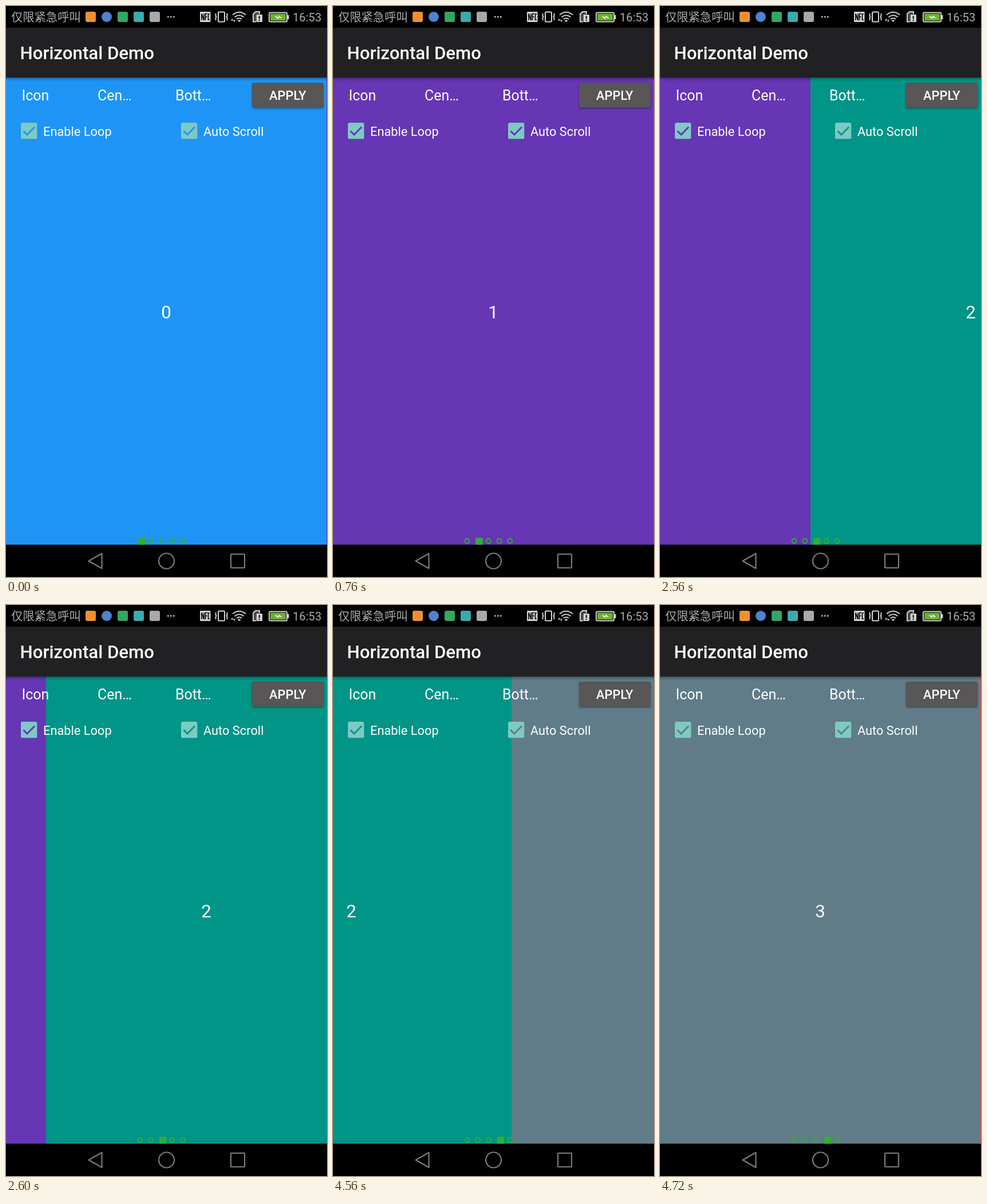
An HTML page for the animation above (4800 ms loop, 561 px wide and 998 px high).

```html
<!DOCTYPE html>
<html lang="en">
<head>
<meta charset="utf-8">
<title>Horizontal Demo</title>
<style>
  html, body { margin: 0; width: 100%; height: 100%; overflow: hidden; background: #000; }
  svg { display: block; width: 561px; height: 998px; }
  text { font-family: Roboto, "Noto Sans", sans-serif; fill: #fff; }
  .title { font-size: 31.2px; font-weight: 500; }
  .spinner { font-size: 24.9px; }
  .label { font-size: 21.8px; }
  .button { font-size: 21.8px; font-weight: 500; }
  .number { font-size: 31.2px; text-anchor: middle; }
  .status { font-size: 20.2px; fill: #adadad; }
  .carrier { font-family: "Noto Sans CJK SC", "Noto Sans CJK", sans-serif; font-size: 20.3px; }
  .line { fill: none; stroke: #d2d2d2; stroke-width: 2; }
  .nav { fill: none; stroke: #7b7b7b; stroke-width: 2.2; stroke-linejoin: round; }
</style>
</head>
<body>
<svg viewBox="0 0 561 998">
  <defs>
    <linearGradient id="shade" x2="0" y2="1">
      <stop stop-color="#000" stop-opacity=".36"/>
      <stop offset=".4" stop-color="#000" stop-opacity=".14"/>
      <stop offset="1" stop-color="#000" stop-opacity="0"/>
    </linearGradient>
    <filter id="lift" x="-10%" y="-20%" width="120%" height="150%">
      <feDropShadow dx="0" dy="1.6" stdDeviation="1.6" flood-opacity=".45"/>
    </filter>
    <clipPath id="content"><rect y="125" width="561" height="816.5"/></clipPath>
    <mask id="tick">
      <rect width="28.5" height="28.5" rx="3" fill="#fff"/>
      <path d="M4.5 14.5 11 21 24 7.5" fill="none" stroke="#000" stroke-width="2.9"/>
    </mask>
    <g id="check"><rect width="28.5" height="28.5" fill="#7dcac3" mask="url(#tick)"/></g>
  </defs>

  <rect width="561" height="998"/>
  <g clip-path="url(#content)">
    <g id="pages"></g>
    <rect y="125" width="561" height="7" fill="url(#shade)"/>
    <g id="dots"></g>
  </g>

  <rect y="38" width="561" height="87" fill="#212022"/>
  <text class="title" x="24.5" y="93">Horizontal Demo</text>

  <text class="spinner" x="27.5" y="165">Icon</text>
  <text class="spinner" x="160" y="165">Cen…</text>
  <text class="spinner" x="296" y="165">Bott…</text>
  <rect x="430" y="134" width="125" height="43.5" rx="3" fill="#595757" filter="url(#lift)"/>
  <text class="button" x="460" y="164.3">APPLY</text>

  <use href="#check" x="26" y="204"/>
  <text class="label" x="65" y="227">Enable Loop</text>
  <use href="#check" x="306" y="204"/>
  <text class="label" x="345" y="227">Auto Scroll</text>

  <!-- status bar -->
  <text class="status carrier" x="9" y="27">仅限紧急呼叫</text>
  <rect x="139" y="10" width="18" height="18" rx="3" fill="#ef8f31"/>
  <circle cx="176" cy="19" r="9" fill="#4f82cf"/>
  <rect x="195" y="10" width="18" height="18" rx="3" fill="#35a562"/>
  <rect x="223" y="10" width="18" height="18" rx="3" fill="#3baaab"/>
  <rect x="251" y="10" width="18" height="18" rx="3" fill="#a9a9a9"/>
  <path d="M282 19h2.6m2.4 0h2.6m2.4 0h2.6" stroke="#c8c8c8" stroke-width="2.5"/>

  <rect x="339" y="10" width="18.5" height="18" rx="1" fill="#d2d2d2"/>
  <text x="348.3" y="24.6" text-anchor="middle" style="font:700 15px 'Liberation Sans Narrow',Roboto,sans-serif;fill:#000" textLength="16" lengthAdjust="spacingAndGlyphs" hidden></text>
  <path d="M342 25V13.5L346 25V13.5M348.5 25V13.5H352M348.5 19H351.5M356 14H353.5V24.2H356" fill="none" stroke="#000" stroke-width="1.6"/>
  <rect class="line" x="371" y="10.5" width="11" height="17" rx="1.5"/>
  <path class="line" d="M366.5 13v4l1 2-1 2v4M386.5 13v4l-1 2 1 2v4"/>
  <path class="line" d="M396 15.5q11.500-9.500 23 0M399.500 19.500q8-6.500 16 0M403 23q4.500-3.500 9 0" stroke-width="2.4"/>
  <path d="M404.500 25.500 407.500 28 410.500 25.500Q407.500 23.500 404.500 25.500M393 25.500 395.200 22 397.400 25.500ZM397 24.500H401L399 28Z" fill="#d2d2d2"/>
  <path class="line" d="M437 27.500H432V14L436 10H443V14"/>
  <path d="M432 14 436 10H443V15H437V27H432Z" fill="#d2d2d2" fill-opacity=".35"/>
  <rect x="437.500" y="15" width="10.500" height="13" rx="1" fill="#d2d2d2"/>
  <path d="M442.700 17.500v5m0 1.500v2" stroke="#000" stroke-width="2"/>
  <rect class="line" x="460" y="11.500" width="31" height="16" rx="2" stroke-width="1.600"/>
  <rect x="462" y="13.500" width="27" height="12" fill="#6ab32b"/>
  <rect x="492" y="16" width="2.500" height="7" fill="#d2d2d2"/>
  <path d="M469 17.500 477 19.500 476 16 483 21.500 475.500 20 476.500 23.500Z" fill="#fff"/>
  <text class="status" x="501" y="27">16:53</text>

  <!-- navigation bar -->
  <path class="nav" d="M144.500 970 167.500 957V983Z"/>
  <circle class="nav" cx="280.500" cy="970" r="13.500"/>
  <rect class="nav" x="393" y="958" width="24" height="24" rx="1"/>
</svg>

<script>
const LOOP = 4800, TICK = 40, SCROLL = 200, PITCH = 560;
const colors = ['#1e95f6', '#6636b5', '#009587', '#5f7c88', '#f44336'];
// Each scroll: first visible moment and the distance still left then.
const scrolls = [[560, 152], [2560, 263], [4560, 312]];

const pages = document.getElementById('pages');
const dots = document.getElementById('dots');

pages.innerHTML = colors.map((color, i) =>
  `<g transform="translate(${i * PITCH})">
    <rect y="125" width="561" height="817" fill="${color}"/>
    <text class="number" x="280" y="545.5">${i}</text>
  </g>`).join('');

function drawDots(selected) {
  dots.innerHTML = colors.map((_, i) => {
    const x = 234.5 + i * 18.7;
    return i === selected
      ? `<rect x="${x - 4}" y="929.5" width="12.5" height="12.5" rx="1.5" fill="#35ad35"/>`
      : `<circle cx="${x}" cy="935" r="4" fill="none" stroke="#35ad35" stroke-width="1.8"/>`;
  }).join('');
}

let shown = -1;
function draw(now) {
  const time = Math.floor((now % LOOP) / TICK) * TICK;
  let selected = 0, offset = 0;
  scrolls.forEach(([start, left], i) => {
    if (time < start) return;
    selected = i + 1;
    const u = (left / PITCH) ** 0.2 - (time - start) / SCROLL;
    offset = selected * PITCH - PITCH * Math.max(0, u) ** 5;
  });
  pages.setAttribute('transform', `translate(${-offset.toFixed(1)})`);
  if (selected !== shown) drawDots(shown = selected);
}

const begin = performance.now();
function frame() {
  draw(performance.now() - begin);
  requestAnimationFrame(frame);
}
frame();
</script>
</body>
</html>
```
